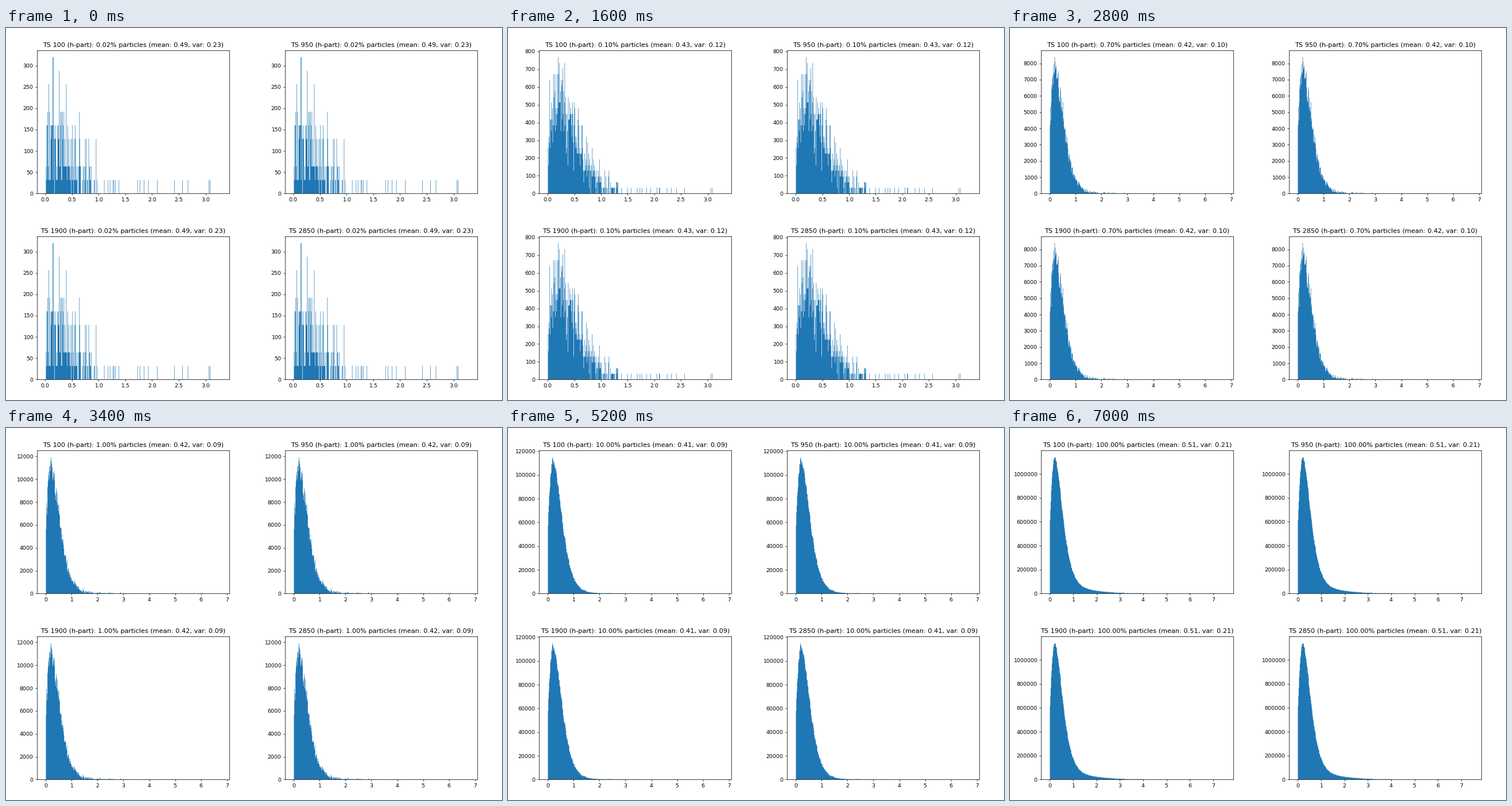
A matplotlib script for the animation above (7.4 s loop, 864 by 648 pixels).

```python
import numpy as np
import matplotlib.pyplot as plt
from matplotlib.animation import FuncAnimation

TOTAL = 1_572_864    # simulated particles
WEIGHT = 32          # bar height of one particle
BINS = 500
STEPS = (100, 950, 1900, 2850)

# Bars are aligned to the pixels of a 640 x 480 panel
PLOT_LEFT, PLOT_WIDTH, PLOT_HEIGHT = 80, 496, 369.6
DATA_WIDTH = PLOT_WIDTH / 1.1
DATA_LEFT = PLOT_LEFT + (PLOT_WIDTH - DATA_WIDTH) / 2

# Share in percent, mean, variance, peak per percent and unit of h
KEYS = np.array([(.02, .49, .23, 4893),
                 (.06, .43, .13, 2773),
                 (.4, .43, .11, 1778),
                 (1, .42, .09, 1770),
                 (10, .41, .09, 1704),
                 (50, .42, .09, 1682),
                 (100, .51, .21, 1525)])

OUTLIERS = [1.68, 1.73, 1.77, 1.85, 1.93, 2.1, 2.42, 2.57, 2.67, 3.06, 3.09]

# 0.02 to 0.09, then 0.1 to 0.9, 1 to 9 and 10 to 100 percent
SHARES = np.concatenate([np.arange(2, 10) / 100, np.arange(1, 10) / 10,
                         np.arange(1, 10), np.arange(10, 101, 10)])


def sample_count(share):
    return round(share / 100 * TOTAL)


def make_particles():
    rng = np.random.default_rng(11)
    grid = np.linspace(0, 6.7, 8001)
    density = ((grid + .04) ** .8 * np.exp(-3.81 * grid ** 1.3)
               + .005 * np.exp(-grid))
    cdf = np.cumsum(density)
    h = np.interp(rng.random(TOTAL), cdf / cdf[-1], grid)

    # The smallest samples hold one dense cluster and a few outliers
    early = h[:sample_count(.06)]
    early[early > 1.35] *= .4
    early[:6] = .155
    early[6:6 + len(OUTLIERS)] = OUTLIERS

    # The second half holds a broad extra population
    late = h[TOTAL // 2:]
    wide = rng.gamma(2.6, .51, len(late))
    wide[wide > 6.8] *= .4
    picked = rng.random(len(late)) < .2
    late[picked] = wide[picked]
    return h


def h_range(share):
    low = .011 if share < .035 else 0
    if share < .15:
        return low, 3.28
    if share < 25:
        return low, 6.75
    return low, 6.86 if share < 65 else 7.48


def statistics(share):
    """Mean, variance and peak rate, linear in 1 / share."""
    keys = KEYS[::-1].T
    return [np.interp(1 / share, 1 / keys[0], row) for row in keys[1:]]


def histogram(share, rate):
    low, high = h_range(share)
    counts, _ = np.histogram(particles[:sample_count(share)], BINS,
                             (low, high))
    peak = round(rate * share * (high - low) / WEIGHT)
    heights = np.rint(counts * peak / counts.max()) * WEIGHT

    unit = 1.05 * heights.max() / PLOT_HEIGHT
    heights = np.rint(heights / unit) * unit
    columns = np.rint(DATA_LEFT + np.linspace(0, DATA_WIDTH, BINS + 1))
    edges = low + (columns - DATA_LEFT) / DATA_WIDTH * (high - low)
    return heights, edges, 1.05 * peak * WEIGHT


def add_panel(index):
    col, row = index % 2, 1 - index // 2
    ax = fig.add_axes([(col + .125) / 2, (row + .11) / 2, .775 / 2, .77 / 2])
    ax.ticklabel_format(style="plain", axis="y")
    bars = ax.stairs(np.zeros(BINS), np.arange(BINS + 1), fill=True,
                     color="#1f77b4")
    bars.set_snap(False)
    return ax, bars


particles = make_particles()
fig = plt.figure(figsize=(12.8, 9.6), dpi=67.5)
panels = [add_panel(i) for i in range(len(STEPS))]


def update(tick):
    share = SHARES[min(tick, len(SHARES) - 1)]
    mean, var, rate = statistics(share)
    heights, edges, top = histogram(share, rate)
    low, high = h_range(share)
    margin = .05 * (high - low)
    for (ax, bars), step in zip(panels, STEPS):
        bars.set_data(heights, edges)
        ax.set_xlim(low - margin, high + margin)
        ax.set_ylim(0, top)
        ax.set_title(f"TS {step} (h-part): {share:.2f}% particles "
                     f"(mean: {mean:.2f}, var: {var:.2f})")
    return []


anim = FuncAnimation(fig, update, frames=37, interval=200, repeat=True,
                     repeat_delay=0, blit=False)
plt.show()
```
